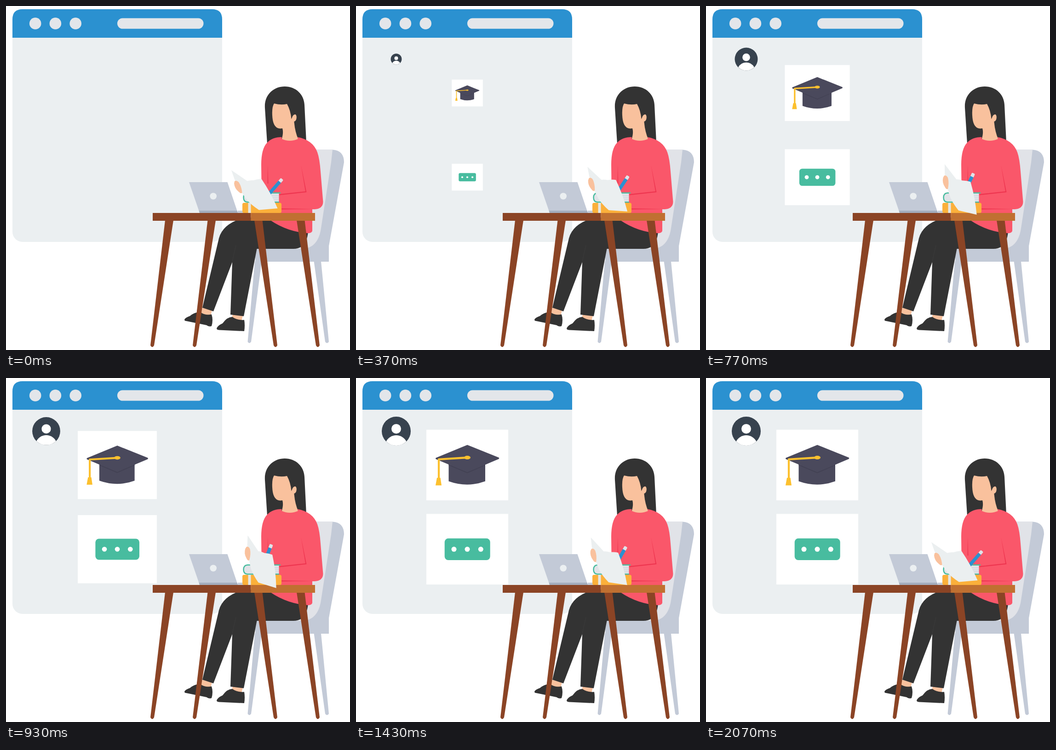
An HTML page for the animation above (2.2 s loop, 748x748 px).

```html
<!DOCTYPE html>
<html lang="en">
<head>
<meta charset="utf-8">
<title>Studying at a desk</title>
<style>
  html, body { margin: 0; width: 100%; height: 100%; overflow: hidden; background: #fff; }
  svg { display: block; width: 100%; height: 100%; }
</style>
</head>
<body>
<svg viewBox="0 0 748 748">
  <g id="window">
    <rect x="14" y="7" width="456" height="506" rx="22" fill="#ebeff1"/>
    <path d="M14 69V29Q14 7 36 7H448Q470 7 470 29V69Z" fill="#2b91d0"/>
    <g fill="#e3e6ea">
      <circle cx="63.7" cy="38" r="12.8"/>
      <circle cx="107.4" cy="38" r="12.8"/>
      <circle cx="151.2" cy="38" r="12.8"/>
      <rect x="242" y="26.5" width="187.5" height="23" rx="11.5"/>
    </g>
  </g>

  <g id="avatar">
    <circle cx="87.5" cy="115.5" r="31.5" fill="#37424e"/>
    <circle cx="87.5" cy="110.5" r="10.5" fill="#fff"/>
    <path d="M65.5 138A24.7 24.7 0 0 1 109.5 138A31.5 31.5 0 0 1 65.5 138Z" fill="#fff"/>
  </g>

  <g id="capCard">
    <rect x="153" y="112.5" width="178" height="153.5" fill="#fff"/>
    <path d="M201.500 185V224.500Q242 239 281 224.500V185Z" fill="#4a495c"/>
    <path d="M201.500 187L242 204L281 187V190L242 207L201.500 190Z" fill="#424153"/>
    <path d="M174 173.500L242 145.500L310.500 173Q312 174.500 310.500 176L242 205L174 176.500Q172 175 174 173.500Z" fill="#4a495c"/>
    <path d="M242 173L180 176.800V219" fill="none" stroke="#fcc02e" stroke-width="4.300" stroke-linejoin="round"/>
    <ellipse cx="242" cy="173" rx="7" ry="4" fill="#fcc02e"/>
    <path d="M176 217H183.500L186 233.500H173Z" fill="#fcc02e"/>
  </g>

  <g id="codeCard">
    <rect x="153" y="295.5" width="178" height="153.500" fill="#fff"/>
    <rect x="192.700" y="348.800" width="99" height="47.200" rx="8" fill="#48bc9f"/>
    <g fill="#fff">
      <circle cx="213" cy="372.300" r="5.500"/>
      <circle cx="242" cy="372.300" r="5.500"/>
      <circle cx="271.300" cy="372.300" r="5.500"/>
    </g>
  </g>

  <g id="chair" fill="#c3cad7">
    <path d="M541 555H556L533 730Q529 736 525.500 730Z"/>
    <path d="M669.500 555H685L702 730Q698 736 694 730Z"/>
    <path d="M660 312.500H710Q735 314 735 340L702 522V556H542V520H650Z"/>
    <path d="M660 312.500H710L707 340L685.500 480Q680 526 645 528H600V400Z" fill="#e1e3e8"/>
  </g>

  <g id="woman">
    <path d="M427 656L448 662L445 673L424 669ZM493 670L515 673L512 685L491 679Z" fill="#f9c19d"/>
    <g fill="#333">
      <path d="M388 682Q389 678 400 674Q412 664 424 666.500Q433 673 447 670.500Q451 683 447 696Q441 698 436 694L392 685Q388 685 388 682Z"/>
      <path d="M458 701Q460 695 471 690Q481 676 492 676Q504 684 518 682.500Q520 694 518 707L463 704.500Q458 704 458 701Z"/>
      <path d="M600 460H520Q472 472 463 505L427 656L451 664L492 557L488 671L517 674.500L545.500 528H625Q654 528 657 490Z"/>
      <path d="M568 300L563 222C561 192 583 175 606 175C630 175 648 192 649 215L653 296Z"/>
    </g>
    <path d="M492 557Q495 540 500 520" fill="none" stroke="#3b3b3b"/>
    <path d="M583 212Q598 216 611 213Q619 227 620.500 246L623 240Q626 235 630 236Q633 240 631 247Q629 251 626.500 251Q628 273 636 291Q618 302 599 291Q604 276 601 266Q596 267 591 265.500Q580 261 579 238Q578 219 583 212Z" fill="#f9c19d"/>
    <path d="M568 297Q579 285 599.500 285Q599 287 599.500 289Q617 297 635 289L633.500 285Q667 291 677 318Q682 332 684 360L689.500 426Q689 441 671 442H666V489Q665 494 656 494Q612 491 575 466L556 430L555 345Q555 310 568 297Z" fill="#fa576a"/>
    <g fill="#ee3650">
      <path d="M569 346L570.500 386H568.500Z"/>
      <path d="M641.500 346L653.500 405L594 411.500V409L651 403Z"/>
      <path d="M597 440L668 441.500L597 442.500Z"/>
    </g>
  </g>

  <g id="desk">
    <g fill="#8b4425">
      <path d="M346 466H364L322 738Q318 745 314 738Z"/>
      <path d="M438.500 466H456L414 738Q410 745 406 738Z"/>
      <path d="M540 466H557.500L590 738Q586 745 582 738Z"/>
      <path d="M632 466H649.500L682 738Q678 745 674 738Z"/>
      <rect x="319" y="450" width="213.500" height="17"/>
    </g>
    <rect x="532.300" y="450" width="139.700" height="17" fill="#c07031"/>
  </g>

  <g id="laptop">
    <path d="M398 383H481.500L504 449.500H421Z" fill="#c3cad7"/>
    <path d="M504 445H532V450H504Z" fill="#c3cad7"/>
    <path d="M419.500 445H502.500L504 450H421Z" fill="#a4adbd"/>
    <circle cx="450.700" cy="413.500" r="7.300" fill="#ebeff1"/>
  </g>

  <g id="books">
    <path d="M523 407H593.500V426H523Q517 424 517 416Q517 409 523 407Z" fill="#e1e3e8"/>
    <path d="M535 412.500H593M535 417H593M535 421.500H593" stroke="#cfd4dc"/>
    <path d="M597 406.500H525Q516.500 407 516.500 416.500Q516.500 426 525 426.500H594" fill="none" stroke="#48bc9f" stroke-width="2.600"/>
    <rect x="514" y="428" width="85" height="22" rx="3.500" fill="#fbb03b"/>
    <rect x="526.500" y="428" width="6" height="22" fill="#e5e5e3"/>
  </g>

  <!-- Drawn upright, standing on its lower end -->
  <g id="pencil">
    <path d="M-3.700 0V-73H3.700V0Z" fill="#2b91d0"/>
    <path d="M-3.700 -73V-79Q-3.700 -81 -1.700 -81H1.700Q3.700 -81 3.700 -79V-73Z" fill="#e1e3e8"/>
  </g>

  <g id="paper">
    <path d="M490 357L524.500 380.500Q530 378.500 538 379Q547 376 555.500 376Q576 406 590.500 440L550 443.500Q534 433 524 422Q509 402 497 377Z" fill="#ebeff0"/>
    <path d="M497 381Q501 378 506 383Q512 392 513.500 406Q511 409 506 404Q497 397 496 386Z" fill="#f9c19d"/>
  </g>
</svg>
<script>
  const LOOP = 2200;
  const PEAK = 29;
  const REST = 62;
  const PAPER_SWING = 22.800;
  const PENCIL_SWING = 20;
  const PENCIL_LEAN = 41.300;

  const growing = [
    ["avatar", 87.5, 115.5],
    ["capCard", 242, 189.2],
    ["codeCard", 242, 372.2],
  ];

  const setTransform = (id, value) =>
    document.getElementById(id).setAttribute("transform", value);

  // Thirty steps a second, with step times rounded to 10 ms
  function stepAt(ms) {
    const rest = ms % 100;
    return 3 * Math.floor(ms / 100) + (rest >= 70 ? 2 : rest >= 30 ? 1 : 0);
  }

  function draw(ms) {
    const step = Math.min(stepAt(ms), REST);
    const scale = Math.min(step / PEAK, 1);
    const swing = step <= PEAK ? step / PEAK : (REST - step) / (REST - PEAK);

    for (const [id, x, y] of growing) {
      setTransform(id, `translate(${x} ${y}) scale(${scale}) translate(${-x} ${-y})`);
    }
    setTransform("paper", `rotate(${PAPER_SWING * swing} 546 441)`);
    setTransform("pencil", `translate(547 437) rotate(${PENCIL_LEAN - PENCIL_SWING * swing})`);
  }

  const start = performance.now();
  function tick() {
    draw((performance.now() - start) % LOOP);
    requestAnimationFrame(tick);
  }
  tick();
</script>
</body>
</html>
```
